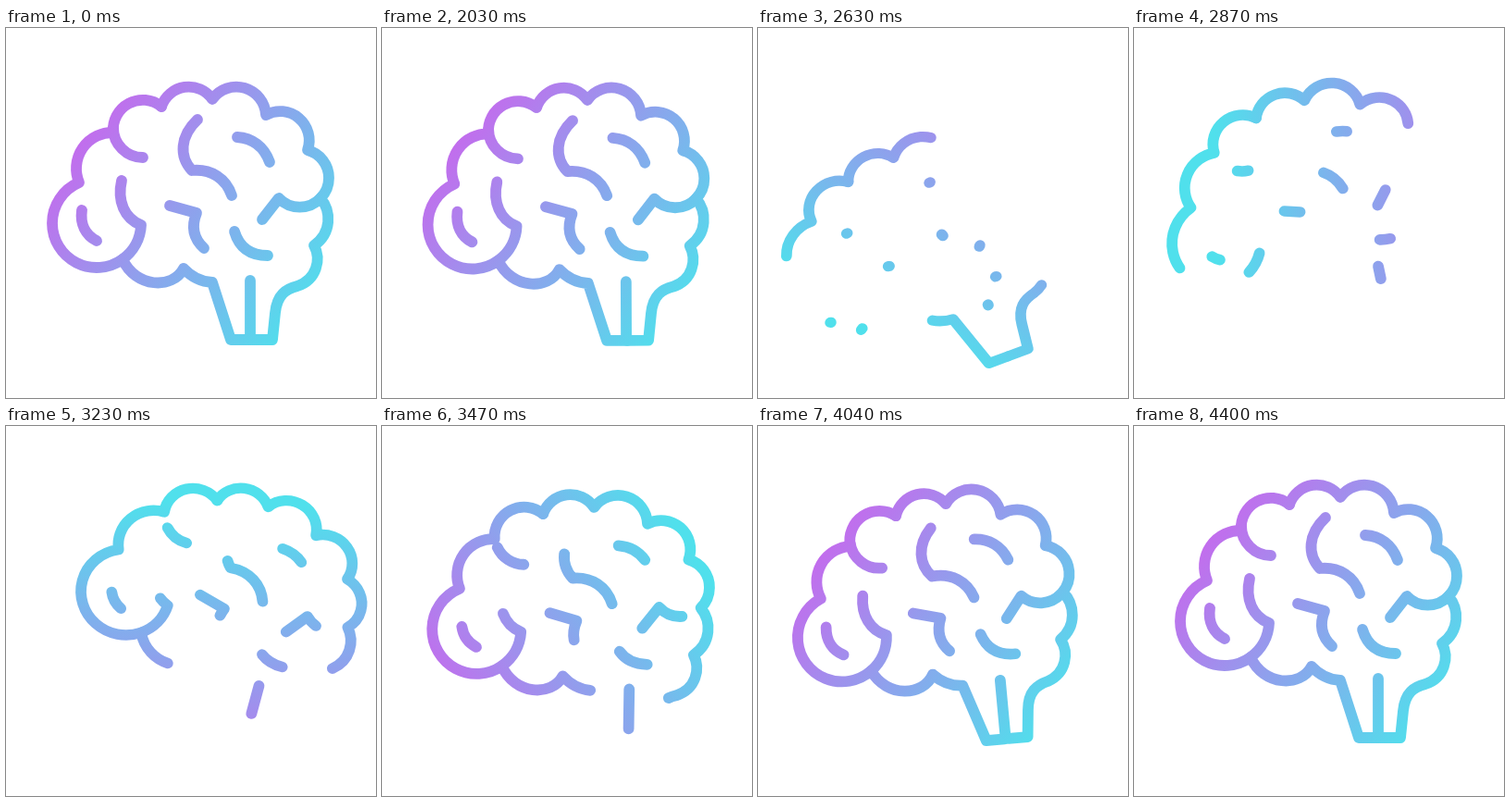
An HTML page that plays this animation: 400 px wide and 400 px high, repeating every 4430 ms.

```html
<!DOCTYPE html>
<html lang="en">
<head>
<meta charset="utf-8">
<title>Brain</title>
<style>
  html, body { margin: 0; width: 100%; height: 100%; overflow: hidden; background: #fff; }
  svg { display: block; width: 100vw; height: 100vh; }
  #brain { fill: none; stroke: #fff; stroke-width: 11.8; stroke-linecap: round; stroke-linejoin: round; }
</style>
</head>
<body>
<svg viewBox="0 0 400 400">
  <defs>
    <linearGradient id="ink" gradientUnits="userSpaceOnUse">
      <stop offset="0" stop-color="#c56aed"/>
      <stop offset="1" stop-color="#50e0ec"/>
    </linearGradient>
    <mask id="lines" maskUnits="userSpaceOnUse" x="0" y="0" width="400" height="400">
      <g id="brain">
        <!-- outline, from the top down both sides to the stem -->
        <path class="edge" pathLength="1" d="M168 85A32 32 0 0 0 116 113A39 39 0 0 0 79 167A48 48 0 0 0 50 211A48 48 0 0 0 126 250C140 281 180 283 192 260Q205 274 223 275L243 337H265"/>
        <path class="edge" pathLength="1" d="M168 85A31 31 0 0 1 223 77A32 32 0 0 1 281 94A31.5 31.5 0 0 1 326 132A31 31 0 0 1 349 162A31 31 0 0 1 340 184C352 198 352 222 333 235C341 250 336 272 315 279C303 282 293 288 291 308L288 337H265"/>
        <!-- folds -->
        <path class="fold" pathLength="1" d="M148 140A32 32 0 0 1 116 108"/>
        <path class="fold" pathLength="1" d="M126 250A48 48 0 0 0 146 213C128 206 120 187 125 165"/>
        <path class="fold" pathLength="1" d="M244 181C238 163 222 152 201 154C187 139 188 117 207 99"/>
        <path class="fold" pathLength="1" d="M250 118C266 119 279 128 285 145"/>
        <path class="fold" pathLength="1" d="M177 192L206 200C200 215 203 228 214 238"/>
        <path class="fold" pathLength="1" d="M98 230C86 224 80 212 82 197"/>
        <path class="fold" pathLength="1" d="M283 246C264 246 252 237 247 220"/>
        <path class="fold" pathLength="1" d="M277 207L295 184A31 31 0 0 0 340 184"/>
        <path class="fold" pathLength="1" d="M264 273V333"/>
      </g>
    </mask>
  </defs>
  <rect width="400" height="400" fill="url(#ink)" mask="url(#lines)"/>
</svg>
<script>
const LOOP = 4430, START = 2000, RAMP = 320;
const brain = document.getElementById('brain');
const ink = document.getElementById('ink');
const edges = document.querySelectorAll('.edge');
const folds = document.querySelectorAll('.fold');

// The swing: rest, down left, passing, up right, back left, rest.
const poses = [
  { t: 0, x: 0, y: 0, turn: 0 },
  { t: 460, x: -40, y: 82, turn: -20.5 },
  { t: 870, x: -13.5, y: 1, turn: -12 },
  { t: 1170, x: 32, y: -6, turn: 16 },
  { t: 1700, x: -17, y: 20, turn: -11 },
  { t: 2300, x: 0, y: 0, turn: 0 },
];

const clamp = v => Math.min(1, Math.max(0, v));
const smooth = v => v * v * (3 - 2 * v);
const easeIn = (t, length, power) => clamp(t / length) ** power;
const easeOut = (t, length) => Math.sin(clamp(t / length) * Math.PI / 2);

// Smooth curve through one property of the poses.
function swing(key, t) {
  const end = poses.length - 1;
  if (t <= 0 || t >= poses[end].t) return 0;
  const i = poses.findIndex(p => p.t > t) - 1;
  const speed = n => n === 0 || n === end ? 0
    : (poses[n + 1][key] - poses[n - 1][key]) / (poses[n + 1].t - poses[n - 1].t);
  const a = poses[i], b = poses[i + 1], d = b.t - a.t;
  const u = (t - a.t) / d, w = 1 - u;
  return a[key] * smooth(w) + b[key] * smooth(u)
    + d * u * w * (speed(i) * w - speed(i + 1) * u);
}

// Each line is wiped from its start, then drawn again from its start.
function trim(paths, wiped, drawn) {
  const full = drawn >= 1 || wiped <= drawn && wiped < 1;
  const empty = wiped >= 1 && drawn <= 0;
  let dash = 'none', offset = 0;
  if (!full) {
    if (wiped >= 1) dash = `${drawn} 2`;
    else if (drawn > 0) dash = `${drawn} ${wiped - drawn} ${1 - wiped} 2`;
    else { dash = `${1 - wiped} 2`; offset = -wiped; }
  }
  for (const p of paths) {
    p.style.visibility = empty ? 'hidden' : 'visible';
    p.setAttribute('stroke-dasharray', dash);
    p.setAttribute('stroke-dashoffset', offset);
  }
}

// The ramp turns once around the centre of the stage.
function turnInk(t) {
  const spin = smooth(clamp(t / 2040));
  const a = (37 + 360 * spin) * Math.PI / 180;
  const mid = 0.47 + 0.21 * Math.sin(Math.PI * spin) ** 2;
  [-mid, 1 - mid].forEach((v, i) => {
    ink.setAttribute('x' + (i + 1), 200 + v * RAMP * Math.cos(a));
    ink.setAttribute('y' + (i + 1), 200 + v * RAMP * Math.sin(a));
  });
}

function paint(t) {
  const turn = swing('turn', t);
  const squash = Math.cos(turn * Math.PI / 180);
  brain.setAttribute('transform',
    `translate(${200 + swing('x', t)} ${200 + swing('y', t)}) rotate(${turn}) scale(1 ${squash}) translate(-200 -200)`);
  turnInk(t);
  trim(edges, easeIn(t, 700, 2.3), easeOut(t - 350, 1800));
  trim(folds, easeIn(t, 630, 1.7), easeOut(t - 610, 1700));
}

const begin = performance.now();
function tick() {
  paint((performance.now() - begin) % LOOP - START);
  requestAnimationFrame(tick);
}
tick();
</script>
</body>
</html>
```
